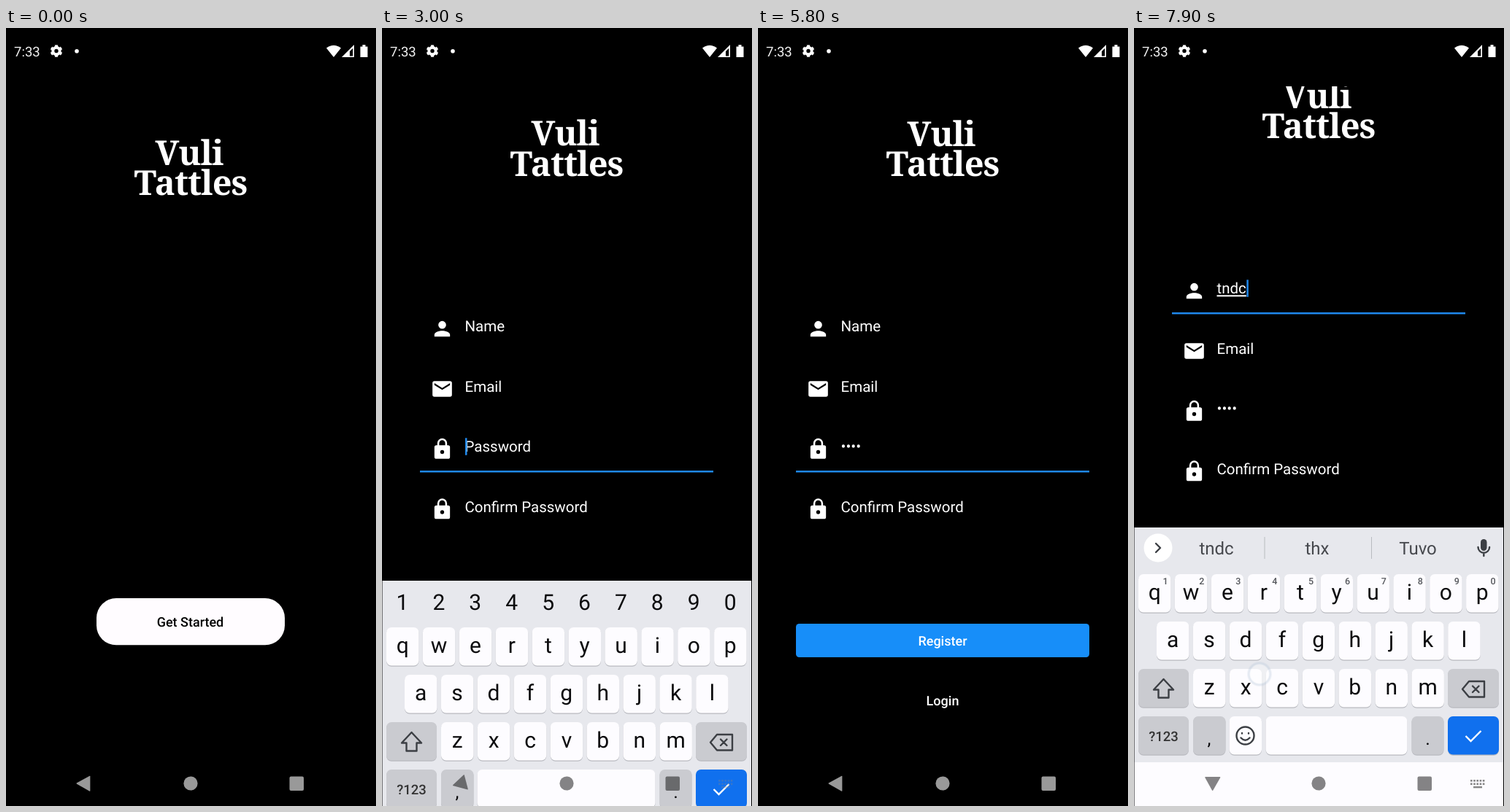
Recreate the animation shown at these times as an HTML page. Size 507 by 1067 pixels, loop 8 s.

```html
<!DOCTYPE html>
<html lang="en">
<head>
<meta charset="utf-8">
<title>Sign-up flow</title>
<style>
html, body { margin: 0; width: 100%; height: 100%; overflow: hidden; background: #000; }
svg { display: block; width: 100%; height: 100%; }
text { font-family: Roboto, sans-serif; white-space: pre; text-rendering: geometricPrecision; }
.logo { font: 600 47px "Noto Serif", serif; letter-spacing: -1px; fill: #fff; }
.mid { text-anchor: middle; }
.btn { font-size: 18px; font-weight: 500; }
.label { font-size: 20.5px; fill: #fff; }
.key { font-size: 30px; fill: #0b0b0d; }
.line { fill: none; stroke: #3c3f44; stroke-width: 2.4; stroke-linejoin: round; stroke-linecap: round; }
</style>
</head>
<body>
<svg id="stage" viewBox="0 0 507 1067"></svg>
<script>
const LOOP = 8000, KB_TOP = 685, KB_TRAVEL = 382, SCROLL = 52;
const BLUE = '#178ef9', KEY = '#fdfcff', DARK_KEY = '#cacbd0';
const ROWS = [['qwertyuiop', 6, 749], ['asdfghjkl', 31, 814], ['zxcvbnm', 81, 879]];
const FIELD_Y = [409, 491.5, 574, 656.5];

// Markup helpers
const rect = (x, y, w, h, rx, fill, more = '') =>
  `<rect x="${x}" y="${y}" width="${w}" height="${h}" rx="${rx}" fill="${fill}" ${more}/>`;
const circle = (x, y, r, more) => `<circle cx="${x}" cy="${y}" r="${r}" ${more}/>`;
const label = (x, y, s, cls, more = '') => `<text x="${x}" y="${y}" class="${cls}" ${more}>${s}</text>`;
const line = d => `<path class="line" d="${d}"/>`;
const group = (id, body, more = '') => `<g id="${id}" ${more}>${body}</g>`;

const ICONS = {
  person: 'M12 12a4 4 0 1 0 0-8a4 4 0 0 0 0 8zm0 2c-2.7 0-8 1.3-8 4v2h16v-2c0-2.7-5.3-4-8-4z',
  mail: 'M20 4H4a2 2 0 0 0-2 2v12a2 2 0 0 0 2 2h16a2 2 0 0 0 2-2V6a2 2 0 0 0-2-2zm0 4l-8 5l-8-5V6l8 5l8-5z',
  lock: 'M18 8h-1V6A5 5 0 0 0 7 6v2H6a2 2 0 0 0-2 2v10a2 2 0 0 0 2 2h12a2 2 0 0 0 2-2V10a2 2 0 0 0-2-2zm-6 9a2 2 0 1 1 0-4a2 2 0 0 1 0 4zM8.9 8V6a3.1 3.1 0 0 1 6.2 0v2z'
};

const logo = y => label(251, y, 'Vuli', 'logo mid') + label(253, y + 41.5, 'Tattles', 'logo mid');

const field = (icon, y, name, id = '') =>
  `<path d="${ICONS[icon]}" fill="#fff" fill-rule="evenodd" transform="translate(66.5 ${y - 12.5}) scale(1.333)"/>`
  + label(113.5, y + 7.3, name, 'label', id && `id="${id}"`);

const buttons = (y, main, other) => rect(52, y, 402, 46, 4.5, BLUE)
  + label(253, y + 29.5, main, 'btn mid', 'fill="#fff"')
  + label(253, y + 112, other, 'btn mid', 'fill="#fff"');

function statusBar() {
  return label(11, 38.7, '7:33', '', 'font-size="18.5" fill="#f2f2f2"')
    + circle(69, 31.5, 4.7, 'fill="none" stroke="#fff" stroke-width="4"')
    + circle(69, 31.5, 7, 'fill="none" stroke="#fff" stroke-width="2.6" pathLength="12" stroke-dasharray="1.1 .9" stroke-dashoffset="-.45"')
    + circle(97, 31.7, 2.8, 'fill="#fff"')
    + '<path fill="#fff" d="M439 27.5Q449 20 459 27.5L449 40ZM485.5 25.5h3v-2.5h4v2.5h3v14.5h-10z"/>'
    + '<path fill="#fff" fill-rule="evenodd" d="M460 40L477 23V40ZM471 32V38.5H475.3V27.7Z"/>';
}

const key = (x, y, w, fill = KEY) =>
  rect(x, y + 1.3, w, 52.5, 7, '#b9bac0') + rect(x, y, w, 52.5, 7, fill);

const mic = rect(475, 701, 8.5, 16, 4.2, '#3c3f44')
  + line('M471.5 712a7.8 7.8 0 0 0 15.6 0M479.3 720v4');

const round = d => circle(33, 713, 19.5, 'fill="#fff"') + line(d);

function toolbar() {
  return round('M36 707l-6 6l6 6')
    + circle(97, 710, 6.7, 'class="line"') + line('M102 715l7 7')
    + line('M163 705a2 2 0 0 1 2-2h14a2 2 0 0 1 2 2v10l-7 8h-9a2 2 0 0 1-2-2zM181 715h-5a2 2 0 0 0-2 2v6M168 709v1M176 709v1M167 714q4 4 8 1')
    + label(243, 719, 'GIF', 'mid', 'font-size="18.5" font-weight="900" fill="#3c3f44"')
    + line('M308 704h18v20h-18zM313 704v3h8v-3M317 701v1M312 711h10M312 715h10M312 719h6')
    + rect(361, 699, 1, 28, 0, '#c3c5ca')
    + [399, 407, 415].map(x => circle(x, 713, 2.7, 'fill="#3c3f44"')).join('') + mic;
}

function suggestions() {
  const word = (x, s) => label(x, 722, s, 'mid', 'font-size="24" fill="#46484d"');
  return round('M30 707l6 6l-6 6') + word(113, 'tndc') + word(251, 'thx') + word(389, 'Tuvo')
    + rect(178.5, 698, 1, 30, 0, '#b9bbc0') + rect(325, 698, 1, 30, 0, '#b9bbc0') + mic;
}

function keyboard() {
  const digits = [...'1234567890'];
  const letters = ROWS.map(([row, x0, y]) => [...row].map((c, i) => {
    const x = x0 + i * 49.9;
    return key(x, y, 44.5) + label(x + 22.2, y + 35, c, 'key mid');
  }).join('')).join('');
  const at = i => 28 + i * 49.9;
  return rect(.5, KB_TOP, 505.5, 322, 0, '#e7e8ed') + rect(.5, 1007, 505.5, 500, 0, '#fdfcff') + letters
    + key(6, 879, 69, DARK_KEY) + line('M40.5 893L54 907.5H47.5V918.5H33.5V907.5H27Z')
    + key(430, 879, 70, DARK_KEY) + line('M459 896H480V917.5H459L450 906.7ZM464 902.5l8.5 8.5M472.5 902.5l-8.5 8.5')
    + key(6, 944, 69, DARK_KEY) + label(40.5, 978, '?123', 'mid', 'font-size="18.5" font-weight="500" fill="#333"')
    + key(81, 944, 44.5, DARK_KEY) + label(103, 983, ',', 'key mid', 'style="font-size:25px"')
    + key(380.5, 944, 44, DARK_KEY) + label(402.5, 983, '.', 'key mid', 'style="font-size:25px"')
    + key(430, 944, 70, '#1070ee')
    + '<path d="M454.5 971l7 7l14-14" fill="none" stroke="#fff" stroke-width="2.4"/>'
    + group('numeric', key(130.5, 944, 244)
      + digits.map((d, i) => label(at(i), 725, d, 'key mid')).join(''))
    + group('plain', key(130.5, 944, 44.5) + key(180.5, 944, 194)
      + circle(152.5, 970.5, 12, 'class="line"') + line('M148 967v.5M157 967v.5M146.5 973.5q6 6.5 12 0')
      + digits.map((d, i) => label(at(i) + 15, 763, d, 'mid', 'font-size="12.5" font-weight="500" fill="#55575c"')).join('')
      + group('toolbar', toolbar()) + group('words', suggestions()))
    + group('popup', rect(0, 2, 49.5, 144, 7, '#000', 'opacity=".12"')
      + rect(0, 0, 49.5, 144, 7, '#c9cad0') + label(24.7, 47, '', 'key mid', 'id="popChar" style="font-size:32px"'));
}

const navBar = rect(47, 1004, 121, 62, 31, 'rgba(128,128,128,.24)', 'id="ripple"')
  + group('nav', '<path id="back" d="M96.7 1035.6Q96.3 1036.3 97 1036.8L114.6 1046.8Q115.4 1047 115.4 1046V1026.5Q115.4 1025.4 114.6 1025.8Z"/>'
    + circle(253, 1036, 9.6, '') + '<rect x="388.5" y="1026.5" width="19.5" height="19.5" rx="2"/>')
  + group('switcher', [1031, 1035.5].map(y =>
      [0, 1, 2, 3, 4].map(i => rect(461 + i * 4.2, y, 2.6, 2.6, 0, '#858585')).join('')).join('')
    + rect(465, 1040, 12, 2.4, 0, '#858585'));

const stop = (at, color, alpha) => `<stop offset="${at}" stop-color="${color}" stop-opacity="${alpha}"/>`;

document.getElementById('stage').innerHTML =
  '<defs><clipPath id="view"><rect id="viewRect" y="80" width="507"/></clipPath><radialGradient id="dot">'
  + stop(0, '#fff', .72) + stop(.7, '#fff', .68) + stop(.8, '#c9d6e4', .95) + stop(.86, '#b4c5d8', .7) + stop(1, '#9db4cc', 0)
  + '</radialGradient></defs>'
  + rect(0, 0, 507, 1067, 0, '#000') + group('status', statusBar())
  + '<g clip-path="url(#view)">'
  + group('intro', logo(187.5) + rect(124, 782, 258, 64.3, 27, '#fffcff')
    + label(252.5, 820.5, 'Get Started', 'btn mid', 'fill="#000"'))
  + group('login', logo(167.5) + field('mail', 480, 'Email') + field('lock', 562.3, 'Password')
    + rect(52, 896, 287, 41, 4, '#010106', 'id="splash"') + buttons(810.3, 'Login', 'Register'))
  + group('join', logo(161.5) + field('person', FIELD_Y[0], 'Name', 'name') + field('mail', FIELD_Y[1], 'Email')
    + field('lock', FIELD_Y[2], 'Password', 'pass') + field('lock', FIELD_Y[3], 'Confirm Password')
    + buttons(817, 'Register', 'Login')
    + rect(52, 0, 402, 2.5, 0, '#1f88ec', 'id="rule"') + rect(0, 0, 2.5, 23.5, 0, '#1f88ec', 'id="caret"'))
  + '</g>' + group('board', keyboard()) + navBar
  + [0, 1, 2].map(i => circle(0, 0, 17.5, `id="touch${i}" fill="url(#dot)"`)).join('');

const $ = {};
document.querySelectorAll('[id]').forEach(e => $[e.id] = e);
const set = (e, o) => { for (const k in o) e.setAttribute(k, o[k]); };
const show = (e, on) => { e.style.display = on ? '' : 'none'; };

// Timeline: taps are [time, x, y, key]
const PASS = [[3600, 190, 843, 'f'], [3800, 291, 841, 'h'], [4000, 142, 843, 'd'], [4200, 204, 906, 'c']];
const NAME = [[7300, 228, 778, 't'], [7450, 350, 906, 'n'], [7600, 150, 842, 'd'], [7750, 172, 886, 'c']];
const TAPS = [[100, 243, 819.5], [1800, 279, 908], [2600, 230, 578], ...PASS,
  [4800, 118, 1032], [6500, 230, 412], ...NAME];
const HOLD = 100;

const ramp = (t, a, b) => Math.min(1, Math.max(0, (t - a) / (b - a)));
const smooth = (t, a, b) => { const p = ramp(t, a, b); return p * p * (3 - 2 * p); };
const typed = (keys, t) => keys.filter(k => t >= k[0] + HOLD).map(k => k[3]).join('');

function boardShift(t) {
  if (t >= 4800 && t < 6000) return KB_TRAVEL * ramp(t, 4800, 5100) ** 1.4;
  const start = t < 4800 ? 2800 : 6623;
  return KB_TRAVEL * (1 - ramp(t, start, start + 400)) ** 2.38;
}

function caretOn(t) {
  if (t < 3600) return t < 3100;
  if (t < 4300) return true;
  if (t < 6500) return Math.floor((t - 4300) / 500) % 2 === 0;
  return t < 7000 || t >= 7300;
}

function drawForm(t) {
  const scroll = SCROLL * (smooth(t, 3000, 3250) - smooth(t, 5100, 5300) + smooth(t, 6600, 6760));
  set($.join, { transform: `translate(0 ${-scroll})` });
  set($.viewRect, { height: (t >= 4800 && t < 5000 ? KB_TOP : 1067) - 80 });

  const pass = typed(PASS, t), name = typed(NAME, t);
  const masked = t >= 5800 ? pass.length : pass.length - 1;
  $.pass.textContent = pass ? '•'.repeat(masked) + pass.slice(masked) : 'Password';
  $.name.textContent = name || 'Name';
  set($.name, { 'text-decoration': name ? 'underline' : 'none' });

  const onName = t >= 6500, value = onName ? name : pass;
  const y = FIELD_Y[onName ? 0 : 2];
  const width = value ? (onName ? $.name : $.pass).getComputedTextLength() : 0;
  show($.rule, t >= 2600);
  show($.caret, t >= 2600 && caretOn(t));
  set($.rule, { y: y + 33 });
  set($.caret, { x: 113.5 + width + .5, y: y - 11.7 });
}

function drawBoard(t) {
  const shift = Math.round(boardShift(t)), numeric = t < 6000;
  show($.board, shift < KB_TRAVEL);
  set($.board, { transform: `translate(0 ${shift})` });
  show($.numeric, numeric);
  show($.plain, !numeric);
  const hasName = typed(NAME, t) !== '';
  show($.toolbar, !hasName);
  show($.words, hasName);

  const press = [...PASS, ...NAME].find(k => t >= k[0] && t < k[0] + HOLD);
  show($.popup, press);
  if (press) {
    const [row, x0, y] = ROWS.find(r => r[0].includes(press[3]));
    set($.popup, { transform: `translate(${x0 + row.indexOf(press[3]) * 49.9 - 2.5} ${y - 92})` });
    $.popChar.textContent = press[3];
  }
}

function drawNav(t) {
  const turn = smooth(t, 2950, 3150) - smooth(t, 4800, 5000) + smooth(t, 6740, 6940);
  const dark = ramp(t, 2800, 2900) - ramp(t, 4800, 4970) + ramp(t, 6630, 6730);
  const shade = Math.round(255 * (1 - dark));
  set($.nav, { fill: `rgba(${shade},${shade},${shade},${.6 - .12 * dark})` });
  set($.back, { transform: `rotate(${-90 * turn} 107 1035.5)` });
  set($.switcher, { opacity: t >= 4800 && t < 6600 ? 0 : Math.min(1, turn * 2) });
  set($.ripple, { opacity: t < 4800 ? 0 : (.4 + .6 * ramp(t, 4800, 4900)) * (1 - ramp(t, 4950, 5300)) });
}

function drawTouches(t) {
  const live = TAPS.filter(k => t >= k[0] && t < k[0] + 230);
  for (let i = 0; i < 3; i++) {
    const e = $['touch' + i], tap = live[i];
    show(e, tap);
    if (tap) set(e, { cx: tap[1], cy: tap[2], opacity: 1 - ramp(t, tap[0] + 80, tap[0] + 220) });
  }
}

function draw(t) {
  const toLogin = smooth(t, 560, 700), toJoin = smooth(t, 1960, 2100);
  [[$.intro, 1 - toLogin], [$.login, toLogin - toJoin], [$.join, toJoin]].forEach(([e, o]) => {
    show(e, o > 0);
    set(e, { opacity: o });
  });
  show($.status, t < 1800 || t >= 2000);
  show($.splash, t >= 1800);
  drawForm(t);
  drawBoard(t);
  drawNav(t);
  drawTouches(t);
}

const begin = performance.now();
function tick() {
  draw((performance.now() - begin) % LOOP);
  requestAnimationFrame(tick);
}
tick();
</script>
</body>
</html>
```
